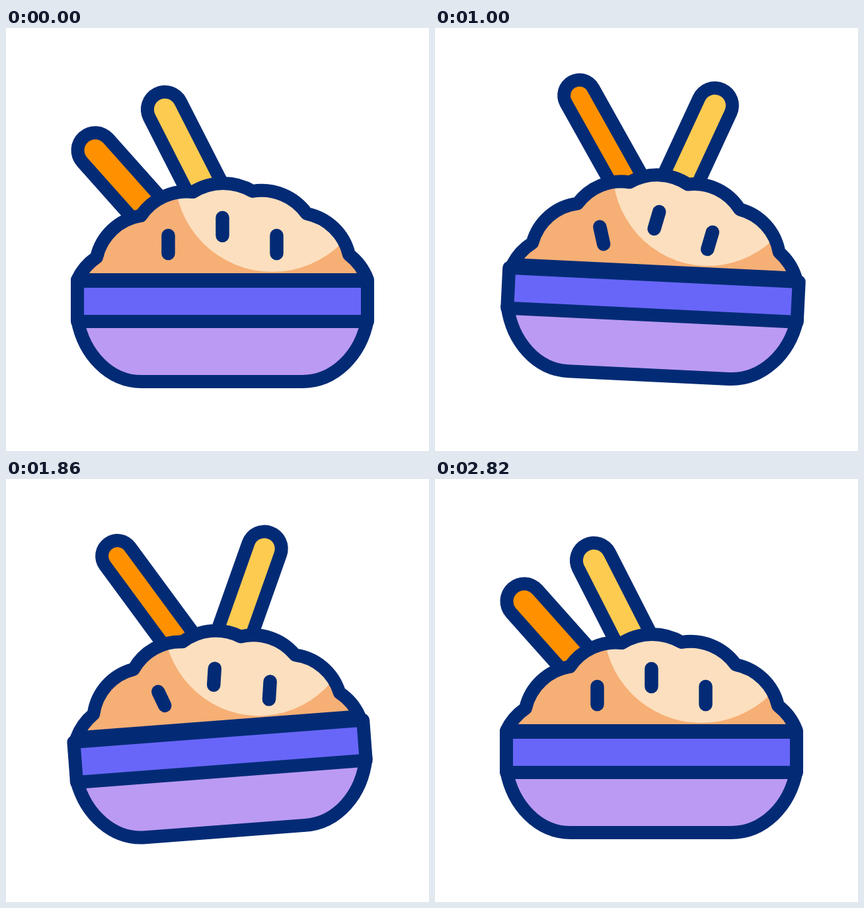
Animation of 640x640 px, one loop 3020 ms. Source, as an HTML page with a canvas:

```html
<!DOCTYPE html>
<html lang="en">
<head>
<meta charset="utf-8">
<title>Rice bowl</title>
<style>
  html, body { margin: 0; height: 100%; overflow: hidden; background: #fff; }
  canvas { display: block; }
</style>
</head>
<body>
<canvas id="stage" width="640" height="640"></canvas>
<script>
const ctx = document.getElementById('stage').getContext('2d');
const LOOP = 3020;
const NAVY = '#032b75', STROKE = 20;
const CENTER = { x: 327.5, y: 413.5 };

const ricePath = new Path2D('M108 381A84 84 0 0 1 137 347A82 82 0 0 1 204 284' +
  'A84 84 0 0 1 283 248A87 87 0 0 1 373 247A84 84 0 0 1 455 281' +
  'A82 82 0 0 1 519 343A84 84 0 0 1 547 381Z');
const bowlPath = new Path2D('M108 441C118 495 157 535 205 535' +
  'L448 535C497 535 537 495 547 441Z');
const rimPath = new Path2D('M108 383H547V444H108Z');

// The bowl rests at the first and last of these times and tips over at the others.
const SWINGS = [360, 890, 1253, 1650, 1900, 2500, 2820];

const rad = deg => deg * Math.PI / 180;
const mix = (a, b, u) => a + (b - a) * u;

function ease(u) {
  u = Math.min(1, Math.max(0, u));
  return u * u * (3 - 2 * u);
}

// Rises from 0 to 1 between start and full, falls back between fade and end.
function pulse(t, start, full, fade, end) {
  return ease((t - start) / (full - start)) - ease((t - fade) / (end - fade));
}

function bowlPose(t) {
  const last = SWINGS.length - 1;
  const tiltAt = i => i % last === 0 ? 0 : i % 2 ? 5 : -5;
  const liftAt = i => i % 2 ? -12.5 * Math.min(i, 2) : 0;
  let i = 0;
  while (i < last - 1 && t >= SWINGS[i + 1]) i++;
  const u = ease((t - SWINGS[i]) / (SWINGS[i + 1] - SWINGS[i]));
  return {
    tilt: rad(mix(tiltAt(i), tiltAt(i + 1), u)),
    lift: mix(liftAt(i), liftAt(i + 1), u)
  };
}

function line(x1, y1, x2, y2, width, color) {
  ctx.beginPath();
  ctx.moveTo(x1, y1);
  ctx.lineTo(x2, y2);
  ctx.lineWidth = width;
  ctx.strokeStyle = color;
  ctx.stroke();
}

function outlined(path, fill) {
  ctx.fillStyle = fill;
  ctx.fill(path);
  ctx.lineWidth = STROKE;
  ctx.strokeStyle = NAVY;
  ctx.stroke(path);
}

// The tip is given before sliding along the stick's own axis.
function stick(x, y, tilt, slide, width, color) {
  const dx = Math.sin(rad(tilt)), dy = -Math.cos(rad(tilt));
  const tipX = x + dx * slide, tipY = y + dy * slide;
  const endX = tipX - dx * 200, endY = tipY - dy * 200;
  line(tipX, tipY, endX, endY, width, NAVY);
  line(tipX, tipY, endX, endY, width - 2 * STROKE, color);
}

function drawSticks(t, pull) {
  const move = pulse(t, 360, 760, 2055, 2820);
  const lean = pulse(t, 360, 620, 2055, 2560);
  stick(mix(135, 202, move), mix(185, 118, move), mix(-41.7, -32, lean),
    27 * pull, 73 - 6 * move, '#ff9100');

  const turn = pulse(t, 360, 840, 2055, 2820);
  const tilt = mix(-27, 22, turn) + 4 * pull;
  const reach = mix(204, 196, turn);
  stick(333 + reach * Math.sin(rad(tilt)), 305 - reach * Math.cos(rad(tilt)),
    tilt, 30 * pull, 73 - 3 * pull, '#fdcb50');
}

function drawRice(stir, pull) {
  ctx.save();
  ctx.translate(CENTER.x, -3 * stir - 2 * pull);
  ctx.scale(1 - .022 * stir, 1);
  ctx.translate(-CENTER.x, 0);
  ctx.fillStyle = '#f6af75';
  ctx.fill(ricePath);
  ctx.save();
  ctx.clip(ricePath);
  ctx.beginPath();
  ctx.arc(403, 221, 148, 0, 2 * Math.PI);
  ctx.fillStyle = '#fcdfbe';
  ctx.fill();
  ctx.restore();
  ctx.lineWidth = STROKE;
  ctx.strokeStyle = NAVY;
  ctx.stroke(ricePath);
  ctx.restore();
}

function drawGrains(stir, pull) {
  for (let i = 0; i < 3; i++) {
    const x = 245.5 + 82 * i, y = i === 1 ? 300.5 : 327.5;
    const tilt = rad((i ? 14 : -15) * stir - 13 * pull);
    const half = 13.5 - 2 * (2 - i) * pull;
    const dx = Math.sin(tilt) * half, dy = Math.cos(tilt) * half;
    line(x + dx, y - dy, x - dx, y + dy, 20.5, NAVY);
  }
}

function draw(now) {
  const t = now % LOOP;
  const { tilt, lift } = bowlPose(t);
  const stir = pulse(t, 520, 1000, 2140, 2560);
  const pull = pulse(t, 960, 1420, 1620, 2080);
  ctx.fillStyle = '#fff';
  ctx.fillRect(0, 0, 640, 640);
  ctx.lineCap = ctx.lineJoin = 'round';
  ctx.save();
  ctx.translate(CENTER.x + 52 * Math.sin(tilt), CENTER.y + lift);
  ctx.rotate(tilt);
  ctx.translate(-CENTER.x, -CENTER.y);
  drawSticks(t, pull);
  drawRice(stir, pull);
  drawGrains(stir, pull);
  outlined(bowlPath, '#bb9af3');
  outlined(rimPath, '#6866f8');
  ctx.restore();
  requestAnimationFrame(draw);
}
draw(performance.now());
</script>
</body>
</html>
```
